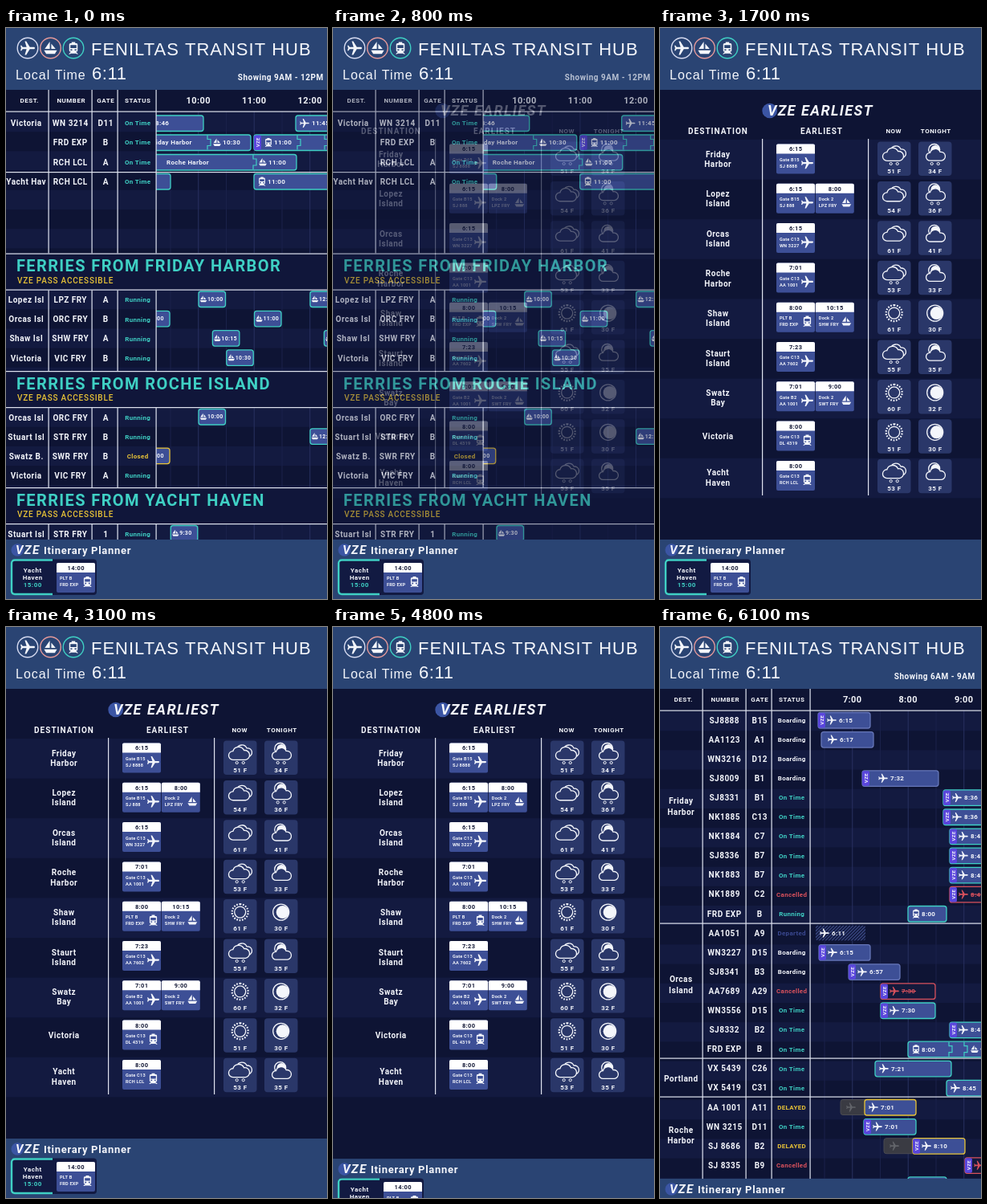
Recreate the animation shown at these times as an HTML page with a canvas. Size 400 by 711 pixels, loop 6.2 s.

```html
<!DOCTYPE html>
<html lang="en">
<head>
<meta charset="utf-8">
<title>Transit hub board</title>
<style>
html, body { margin: 0; width: 100%; height: 100%; overflow: hidden; background: #0e1434; }
canvas { display: block; }
</style>
</head>
<body>
<canvas id="stage" width="400" height="711"></canvas>
<script>
const W = 400, H = 711, LOOP = 6200;
const WHITE = '#f4f6fb', TEAL = '#3fd0c4', YELLOW = '#e8c337', RED = '#d9515c';
const HEADER = '#2a4473', NAVY = '#0e1434', STRIPE = '#131a40', CHIP = '#3d4f96', TILE = '#2a3769';
const BRAND = 'VZE';
const STATUS = {
  'On Time': TEAL, Running: TEAL, Boarding: WHITE, Cancelled: RED,
  Departed: '#3a4890', DELAYED: YELLOW, Closed: YELLOW
};

const stage = document.getElementById('stage').getContext('2d');
let ctx = stage;

const PLANE = new Path2D('M10 0C10-.9 9.3-1.5 8.5-1.5H3L-2-9.5H-4L-1.5-1.5H-7L-8.5-3.5H-10L-9 0L-10 3.5H-8.5L-7 1.5H-1.5L-4 9.5H-2L3 1.5H8.5C9.3 1.5 10 .9 10 0Z');
const BOAT = new Path2D('M-9 3H9L6 8H-6ZM-1-9V1H-8ZM1-6V1H7Z');
const TRAIN = new Path2D('M-3-10H3V-8H5Q7-8 7-6V4Q7 6 5 6H4L8 10H5.5L4.5 9H-4.5L-5.5 10H-8L-4 6H-5Q-7 6-7 4V-6Q-7-8-5-8H-3ZM-5-5V0H5V-5ZM-5 2V4H-2V2ZM2 2V4H5V2Z');
const CLOUD = new Path2D('M-8 8A5.5 5.5 0 0 1-8-3A7.5 7.5 0 0 1 6-4A6 6 0 0 1 8 8Z');

function text(s, x, y, size, { color = WHITE, align = 'center', weight = 700, gap = .5, style = '', font = 'Roboto' } = {}) {
  ctx.font = `${style} ${weight} ${size}px ${font}, sans-serif`;
  ctx.letterSpacing = gap + 'px';
  ctx.textAlign = align;
  ctx.fillStyle = color;
  ctx.fillText(s, align === 'center' ? x + gap / 2 : x, y + size * .355);
}

function rect(x, y, w, h, color) {
  ctx.fillStyle = color;
  ctx.fillRect(x, y, w, h);
}

function box(x, y, w, h, r, fill, stroke, line = 1.3) {
  ctx.beginPath();
  ctx.roundRect(x, y, w, h, r);
  if (fill) { ctx.fillStyle = fill; ctx.fill(); }
  if (stroke) { ctx.strokeStyle = stroke; ctx.lineWidth = line; ctx.stroke(); }
}

function disc(x, y, r, fill, stroke, line = 1.3) {
  box(x - r, y - r, 2 * r, 2 * r, r, fill, stroke, line);
}

function icon(path, x, y, scale, color = WHITE) {
  ctx.save();
  ctx.translate(x, y);
  ctx.scale(scale, scale);
  ctx.fillStyle = color;
  ctx.fill(path, 'evenodd');
  ctx.restore();
}

function brand(x, y, size) {
  disc(x + size * .15, y, size * .52, '#3b55a4');
  text(BRAND, x, y, size, { align: 'left', style: 'italic', gap: 1.3 });
}

function header(showing) {
  rect(0, 0, W, 77, HEADER);
  [[27, PLANE, '#d5daf0'], [55.5, BOAT, '#e3999a'], [84, TRAIN, TEAL]].forEach(([x, path, ring]) => {
    disc(x, 25, 12.8, null, ring, 1.4);
    icon(path, x, 25, path === TRAIN ? .75 : .9);
  });
  const arial = { align: 'left', weight: 400, font: 'Liberation Sans' };
  text('FENILTAS TRANSIT HUB', 106, 26, 22, { ...arial, gap: 1 });
  text('Local Time', 12, 58, 16, { ...arial, gap: 1 });
  text('6:11', 107, 56, 22, { ...arial, gap: .6 });
  if (showing) text('Showing ' + showing, 342, 61, 10);
}

// Timeline

function hatch(x, y, w) {
  ctx.save();
  box(x, y, w, 19, 3, '#11183c');
  ctx.clip();
  ctx.strokeStyle = '#3c4a86';
  ctx.lineWidth = 1.2;
  for (let i = x - 20; i < x + w; i += 4) {
    ctx.beginPath();
    ctx.moveTo(i, y + 19);
    ctx.lineTo(i + 19, y);
    ctx.stroke();
  }
  ctx.restore();
}

function chip(x, y, w, status, label, { path = PLANE, tab = false, pad = 0, small = false } = {}) {
  const top = y - 9.5, off = status === 'Cancelled', ink = off ? RED : WHITE;
  if (status === 'Departed') hatch(x, top, w);
  else box(x, top, w, 19.5, 3, off ? '#141a3c' : CHIP, status === 'Boarding' ? '#6676b8' : STATUS[status]);
  if (tab) {
    box(x, top + .5, 9, 18.5, 2, '#5a46dc');
    ctx.save();
    ctx.translate(x + 4.5, y);
    ctx.rotate(-Math.PI / 2);
    text(BRAND, 0, 0, 6, { gap: .4 });
    ctx.restore();
  }
  const left = x + pad + (tab ? 17 : small ? 6 : 11);
  if (path) icon(path, left, y, path === PLANE ? .58 : small ? .48 : .55, ink);
  const labelX = left + (small ? 5 : path === PLANE ? 9 : 7);
  text(label, labelX, y, small ? 7 : 8, { align: 'left', color: ink, gap: .3 });
  if (off) rect(labelX, y - .4, 18, 1, RED);
}

function notch(x, y) {
  ctx.strokeStyle = TEAL;
  ctx.lineWidth = 1.2;
  ctx.stroke(new Path2D(`M${x} ${y - 9}V${y - 4}H${x + 4}V${y + 4}H${x}V${y + 9}`));
}

function leg(x, y, path, label) {
  icon(path, x, y, .55);
  text(label, x + 7, y, 8, { align: 'left', gap: .3 });
}

// Stripes restart with a light row at each of the given tops.
function board(showing, firstHour, shift, tops, cells, timeline) {
  tops.forEach(top => {
    rect(0, top === tops[0] ? 77 : top, W, H, NAVY);
    for (let y = top; y < H; y += 48.4) rect(0, y, W, 24.2, STRIPE);
  });
  header(showing);
  ['DEST.', 'NUMBER', 'GATE', 'STATUS'].forEach((s, i) => text(s, [29, 81, 124, 164][i], 90, 8));
  ctx.save();
  ctx.beginPath();
  ctx.rect(187, 77, 213, H);
  ctx.clip();
  ctx.translate(shift, 0);
  for (let i = 0; i < 6; i++) rect(204.5 + 34.75 * i, 104, 1, H, i % 2 ? '#28315f' : '#1a214a');
  for (let i = 0; i < 3; i++) text(firstHour + i + ':00', 239.5 + 69.5 * i, 90, 11, { gap: .4 });
  timeline();
  ctx.restore();
  [53, 107, 139, 187].forEach(x => rect(x - .5, 77, 1.2, H, '#dfe3ef'));
  rule(104);
  cells();
}

function rule(y) { rect(0, y - .5, W, 1.2, '#dfe3ef'); }

function row(y, dest, number, gate, status) {
  text(dest, 25, y, 10);
  text(number, 80, y, 10);
  text(gate, 124, y, 10);
  text(status, 164, y, 8, { color: STATUS[status], gap: .3 });
}

const TAB = { tab: true };
const RAIL = { path: TRAIN, pad: -1 };
// number, gate, status, chip x, chip width, label, chip options
const MORNING = [
  ['SJ8888', 'B15', 'Boarding', 197, 65, '6:15', TAB],
  ['AA1123', 'A1', 'Boarding', 201, 65, '6:17', { pad: 3 }],
  ['WN3216', 'D12', 'Boarding'],
  ['SJ8009', 'B1', 'Boarding', 252, 95, '7:32', { tab: true, pad: 9 }],
  ['SJ8331', 'B1', 'On Time', 353, 70, '8:36', TAB],
  ['NK1885', 'C13', 'On Time', 353, 70, '8:36', TAB],
  ['NK1884', 'C7', 'On Time', 361, 70, '8:45', TAB],
  ['SJ8336', 'B7', 'On Time', 361, 70, '8:45', TAB],
  ['NK1883', 'B7', 'On Time', 361, 70, '8:45', TAB],
  ['NK1889', 'C2', 'Cancelled', 361, 70, '8:45', TAB],
  ['FRD EXP', 'B', 'Running', 309, 48, '8:00', RAIL],
  ['AA1051', 'A9', 'Departed', 194, 62, '6:11', {}],
  ['WN3227', 'D15', 'Boarding', 198, 64, '6:15', TAB],
  ['SJ8341', 'B3', 'Boarding', 235, 64, '6:57', TAB],
  ['AA7689', 'A29', 'Cancelled', 275, 68, '7:30', TAB],
  ['WN3556', 'D15', 'On Time', 275, 68, '7:30', TAB],
  ['SJ8332', 'B2', 'On Time', 361, 70, '8:45', TAB],
  ['FRD EXP', 'B', 'On Time', 309, 120, '8:00', RAIL],
  ['VX 5439', 'C26', 'On Time', 268, 95, '7:21', {}],
  ['VX 5419', 'C31', 'On Time', 357, 80, '8:45', {}],
  ['AA 1001', 'A11', 'DELAYED', 255, 64, '7:01', {}],
  ['WN 3215', 'D11', 'On Time', 254, 65, '7:01', TAB],
  ['SJ 8686', 'B2', 'DELAYED', 315, 65, '8:10', TAB],
  ['SJ 8335', 'B9', 'Cancelled', 380, 65, '9:05', TAB],
  ['FRD EXP', 'B', 'On Time', 309, 48, '8:00', RAIL]
];
const rowY = i => 116 + 24.1 * i;

function morningBoard(shift) {
  board('6AM - 9AM', 7, shift, [105], () => {
    MORNING.forEach(([number, gate, status], i) => row(rowY(i), '', number, gate, status));
    [369, 537, 585].forEach(rule);
    [['Friday', 216], ['Harbor', 230], ['Orcas', 438], ['Island', 452], ['Portland', 562], ['Roche', 626], ['Harbor', 639]]
      .forEach(([s, y]) => text(s, 26, y, 10));
  }, () => {
    [[225, 20], [279, 22]].forEach(([x, i]) => {
      box(x, rowY(i) - 9.5, 40, 19, 3, '#3a3b43', '#4a4b52', 1);
      icon(PLANE, x + 13, rowY(i), .58, '#62646a');
    });
    MORNING.forEach(([, , status, x, w, label, options], i) => {
      if (x) chip(x, rowY(i), w, status, label, options);
    });
    notch(360, rowY(17));
    notch(379, rowY(17));
    leg(392, rowY(17), BOAT, '9:00');
  });
}

// section y, then rows of destination, number, gate, status, departure hours
const FERRIES = [
  [338.5, 'FRIDAY HARBOR', [
    ['Lopez Isl', 'LPZ FRY', 'A', 'Running', 10, 12],
    ['Orcas Isl', 'ORC FRY', 'B', 'Running', 9, 11],
    ['Shaw Isl', 'SHW FRY', 'A', 'Running', 10.25, 12.25],
    ['Victoria', 'VIC FRY', 'B', 'Running', 10.5]]],
  [485, 'ROCHE ISLAND', [
    ['Orcas Isl', 'ORC FRY', 'A', 'Running', 10],
    ['Stuart Isl', 'STR FRY', 'B', 'Running', 12],
    ['Swatz B.', 'SWR FRY', 'B', 'Closed', 9],
    ['Victoria', 'VIC FRY', 'A', 'Running']]],
  [630, 'YACHT HAVEN', [['Stuart Isl', 'STR FRY', '1', 'Running', 9.5]]]
];
const clock = h => Math.floor(h) + ':' + String(h % 1 * 60).padStart(2, '0');

function ferryBoard(shift) {
  board('9AM - 12PM', 10, shift, [105, ...FERRIES.map(([y]) => y - 12.5)], () => {
    row(118, 'Victoria', 'WN 3214', 'D11', 'On Time');
    row(142, '', 'FRD EXP', 'B', 'On Time');
    row(167, '', 'RCH LCL', 'A', 'On Time');
    row(191.5, 'Yacht Hav', 'RCH LCL', 'A', 'On Time');
    rule(179.5);
    FERRIES.forEach(([y, place, rows]) => {
      rect(0, y - 58, W, 46, '#10163a');
      rule(y - 57.5);
      rule(y - 12.5);
      text('FERRIES FROM ' + place, 13, y - 42.5, 20, { color: TEAL, align: 'left', gap: 1.4 });
      text(BRAND + ' PASS ACCESSIBLE', 14, y - 24.5, 10, { color: YELLOW, align: 'left', weight: 500, gap: .8 });
      rows.forEach((cells, i) => row(y + 24.2 * i, ...cells));
    });
  }, () => {
    const go = 'On Time', bare = { path: null };
    chip(150, 118.5, 96, go, '8:46', { path: null, pad: 18 });
    chip(361, 118.5, 90, go, '11:45');
    chip(100, 142.5, 205, go, 'Friday Harbor', { path: null, pad: 61 });
    notch(251, 142.5);
    leg(263, 142.5, BOAT, '10:30');
    chip(309, 142.5, 130, go, '11:00', { path: TRAIN, tab: true, pad: 1 });
    notch(363, 142.5);
    notch(397, 142.5);
    chip(100, 167, 262, go, 'Roche Harbor', { path: null, pad: 82 });
    notch(308, 167);
    leg(320, 167, BOAT, '11:00');
    chip(120, 191, 85, go, '', bare);
    chip(309, 191, 130, go, '11:00', RAIL);
    FERRIES.forEach(([y, , rows]) => rows.forEach(([, , , status, ...hours], i) =>
      hours.forEach(h => chip(240 + 69.5 * (h - 10), y - 1 + 24.3 * i, 33.5, status, clock(h), { path: BOAT, small: true }))));
  });
}

// Earliest page

function card(x, y, time, line1, line2, path) {
  box(x, y, 48, 37, 2, CHIP);
  box(x, y, 48, 12, [2, 2, 0, 0], '#fff');
  text(time, x + 24, y + 6.3, 7.5, { color: '#161b38', gap: .4 });
  text(line1, x + 4, y + 19.5, 5.6, { align: 'left', gap: .2 });
  text(line2, x + 4, y + 27.5, 5.6, { align: 'left', gap: .2 });
  icon(path, x + 38.5, y + 23.5, path === PLANE ? .75 : .66);
}

function cloud(x, y, scale) {
  ctx.save();
  ctx.translate(x, y);
  ctx.scale(scale, scale);
  ctx.fillStyle = TILE;
  ctx.strokeStyle = WHITE;
  ctx.lineWidth = 1.3 / scale;
  ctx.fill(CLOUD);
  ctx.stroke(CLOUD);
  ctx.restore();
}

function drops(x, y) {
  disc(x - 4, y, 1.6, null, WHITE, 1);
  disc(x + 4, y, 1.6, null, WHITE, 1);
}

function moon(x, y, r) {
  disc(x, y, r, TILE);
  disc(x + r * .2, y, r * .8, WHITE);
  disc(x, y, r, null, WHITE);
}

const WEATHER = {
  cloud(x, y) { cloud(x + 3, y - 2, .9); cloud(x - 1, y + 1, .98); },
  rain(x, y) { WEATHER.cloud(x, y - 1); drops(x, y + 11.5); },
  sun(x, y) {
    disc(x, y, 7, null, WHITE);
    ctx.setLineDash([1.7, 1.7]);
    disc(x, y, 10, null, WHITE, 2.2);
    ctx.setLineDash([]);
  },
  moon(x, y) { moon(x, y, 10); },
  night(x, y) { moon(x - 1, y - 4, 7); cloud(x + 1, y + 2.5, .9); },
  nightRain(x, y) { WEATHER.night(x, y - 2); drops(x, y + 11.5); }
};

// destination, now, temperature, tonight, temperature, cards
const TRIPS = [
  ['Friday Harbor', 'rain', 51, 'nightRain', 34, ['6:15', 'Gate B15', 'SJ 8888', PLANE]],
  ['Lopez Island', 'cloud', 54, 'nightRain', 36, ['6:15', 'Gate B15', 'SJ 888', PLANE], ['8:00', 'Dock 2', 'LPZ FRY', BOAT]],
  ['Orcas Island', 'cloud', 61, 'night', 41, ['6:15', 'Gate C13', 'WN 3227', PLANE]],
  ['Roche Harbor', 'rain', 53, 'night', 33, ['7:01', 'Gate C13', 'AA 1001', PLANE]],
  ['Shaw Island', 'sun', 61, 'moon', 30, ['8:00', 'PLT B', 'FRD EXP', TRAIN], ['10:15', 'Dock 2', 'SHW FRY', BOAT]],
  ['Staurt Island', 'rain', 55, 'night', 35, ['7:23', 'Gate C13', 'AA 7602', PLANE]],
  ['Swatz Bay', 'sun', 60, 'moon', 32, ['7:01', 'Gate B2', 'AA 1001', PLANE], ['9:00', 'Dock 2', 'SWT FRY', BOAT]],
  ['Victoria', 'sun', 51, 'moon', 30, ['8:00', 'Gate C13', 'DL 4319', TRAIN]],
  ['Yacht Haven', 'rain', 53, 'night', 35, ['8:00', 'Gate C13', 'RCH LCL', TRAIN]]
];

function earliest() {
  rect(0, 77, W, H, NAVY);
  header();
  brand(134, 103, 18);
  text('EARLIEST', 176, 103, 18, { align: 'left', style: 'italic', gap: 1.4 });
  text('DESTINATION', 72, 128.5, 10, { gap: 1 });
  text('EARLIEST', 201, 128.5, 10, { gap: 1 });
  text('NOW', 291, 128.5, 8);
  text('TONIGHT', 343.5, 128.5, 8);
  TRIPS.forEach(([place, now, high, tonight, low, ...cards], i) => {
    const y = 49.6 * i;
    if (i % 2 === 0) rect(0, 139 + y, W, 49.6, STRIPE);
    const words = place.split(' ');
    words.forEach((s, k) => text(s, 72, y + (words.length > 1 ? 157 + 12.2 * k : 161), 10));
    cards.forEach((c, k) => card(145 + 48.8 * k, 144.5 + 49.3 * i, ...c));
    [[now, high, 271], [tonight, low, 322]].forEach(([kind, degrees, x]) => {
      const top = 141.5 + 49.4 * i;
      box(x, top, 41.5, 42.5, 4, TILE);
      WEATHER[kind](x + 20.7, top + 16);
      text(degrees + ' F', x + 20.7, top + 36.5, 8);
    });
  });
  [127.5, 259.5].forEach(x => rect(x - .5, 138, 1.2, 444, '#dfe3ef'));
}

function planner(drop) {
  ctx.save();
  ctx.translate(0, drop);
  rect(0, 637, W, 74, HEADER);
  brand(12, 650, 15);
  text('Itinerary Planner', 47, 650, 13, { align: 'left', gap: .7 });
  box(6, 661.5, 107, 44.5, 4, '#121a42');
  ctx.strokeStyle = TEAL;
  ctx.lineWidth = 2.4;
  ctx.stroke(new Path2D('M58 662.5H11Q7 662.5 7 666.5V701Q7 705 11 705H58'));
  text('Yacht', 33, 675, 8);
  text('Haven', 33, 684, 8);
  text('15:00', 33, 693.5, 8, { color: TEAL });
  card(63, 666, '14:00', 'PLT B', 'FRD EXP', TRAIN);
  ctx.restore();
}

// Playback

const layer = document.createElement('canvas');
layer.width = W;
layer.height = H;
const layerCtx = layer.getContext('2d');

function blend(draw, alpha) {
  if (alpha <= 0) return;
  ctx = layerCtx;
  ctx.clearRect(0, 0, W, H);
  draw();
  ctx = stage;
  ctx.globalAlpha = alpha;
  ctx.drawImage(layer, 0, 0);
  ctx.globalAlpha = 1;
}

const ramp = (t, from, to) => Math.min(1, Math.max(0, (t - from) / (to - from)));
const ease = p => p * p * (3 - 2 * p);

function frame() {
  const t = performance.now() % LOOP;
  const toEarliest = ramp(t, 650, 1150), toMorning = ramp(t, 5475, 5975);
  if (toEarliest < 1) {
    ferryBoard(-.0016 * t);
    blend(earliest, toEarliest);
  } else {
    earliest();
    blend(() => morningBoard(.0016 * (6100 - t)), toMorning);
  }
  planner(50 * ease(ramp(t, 4400, 5200)));
  requestAnimationFrame(frame);
}
frame();
</script>
</body>
</html>
```
